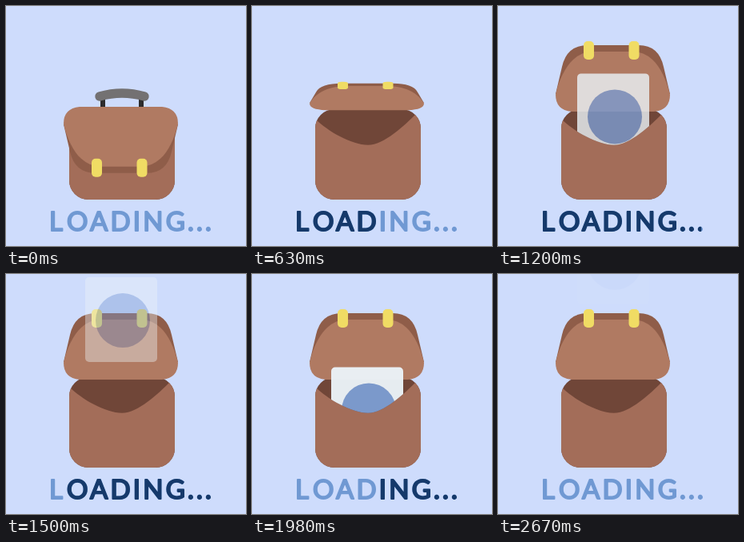
Animation of 300 by 300 pixels, one loop 2.7 s. Source, as an HTML page:

```html
<!DOCTYPE html>
<html>
<head>
<meta charset="utf-8">
<style>
  html, body { margin: 0; height: 100%; overflow: hidden; background: #cedcfc; }
  svg { display: block; width: 100%; height: 100%; }
  text {
    font: 33px Lato, sans-serif; letter-spacing: 3.2px;
    stroke-width: 2; stroke-linejoin: round;
  }
</style>
</head>
<body>
<svg viewBox="0 0 300 300">
  <defs>
    <clipPath id="sweep"><rect id="window" y="240" height="60"/></clipPath>
    <clipPath id="pocket">
      <path d="M0 0H300V134H206C190 150 165 173.7 145 173.7C125 173.7 95 157 79 141H0Z"/>
    </clipPath>
    <clipPath id="body"><rect x="79" y="129" width="132" height="113" rx="24"/></clipPath>
    <text id="label" x="54" y="281" dx="0 3">LOADING...</text>
  </defs>

  <path d="M121 115V130M169 115V130" stroke="#2d2c2d" stroke-width="6"/>
  <path d="M117 113Q145 105 173 113" fill="none" stroke="#737172" stroke-width="11.5" stroke-linecap="round"/>

  <g clip-path="url(#body)">
    <rect x="79" y="129" width="132" height="113" fill="#704638"/>
    <path d="M79 141C95 157 125 173.7 145 173.7C165 173.7 190 150 206 134H211V242H79Z" fill="#a36d59"/>
  </g>

  <g id="flap">
    <path d="M72 148L80 182Q86 209 112 209H176Q201 209 207 182L215 148Z" fill="#8f5d49"/>
    <path d="M92 126H195Q215 128 215 147C211 165 203 182 193 191Q182 201 169 201H118Q105 201 94 191C84 182 76 165 72 147Q72 128 92 126Z" fill="#b07a62"/>
    <g fill="#f0dc64">
      <rect x="107" y="191" width="13" height="23" rx="5"/>
      <rect x="163.5" y="191" width="13" height="23" rx="5"/>
    </g>
  </g>

  <g clip-path="url(#pocket)">
    <g id="card">
      <rect x="99" width="90" height="106" rx="5" fill="#ecf4f9"/>
      <circle cx="146" cy="54" r="34" fill="#7c9dd3"/>
    </g>
  </g>

  <use href="#label" fill="#7099d3" stroke="#7099d3"/>
  <g clip-path="url(#sweep)"><use href="#label" fill="#163a6b" stroke="#163a6b"/></g>
</svg>
<script>
  const LOOP = 2700, HALF = LOOP / 2, PASS = LOOP / 3;
  const $ = id => document.getElementById(id);
  const set = (id, attrs) => {
    for (const name in attrs) $(id).setAttribute(name, attrs[name]);
  };

  function draw(now) {
    const t = now % LOOP;

    // The flap turns over its hinge, then stays open.
    const turn = Math.max(-1, 1 - 2 * t / PASS);
    set('flap', { transform: `translate(0 129) scale(1 ${turn}) translate(0 -129)` });

    // The card rises out of the bag twice, fading on its way.
    const rise = t / PASS - (t < 2 * PASS ? 1 : 2);
    set('card', {
      transform: `translate(0 ${165 - 241 * rise})`,
      opacity: rise < -0.04 ? 0 : Math.min(1, 1.2 * (1 - rise))
    });

    // The dark lettering is wiped in, then wiped out.
    const edge = 50 + 0.17 * (t % HALF);
    set('window', t < HALF ? { x: 0, width: edge } : { x: edge, width: 300 - edge });

    requestAnimationFrame(draw);
  }
  requestAnimationFrame(draw);
</script>
</body>
</html>
```
